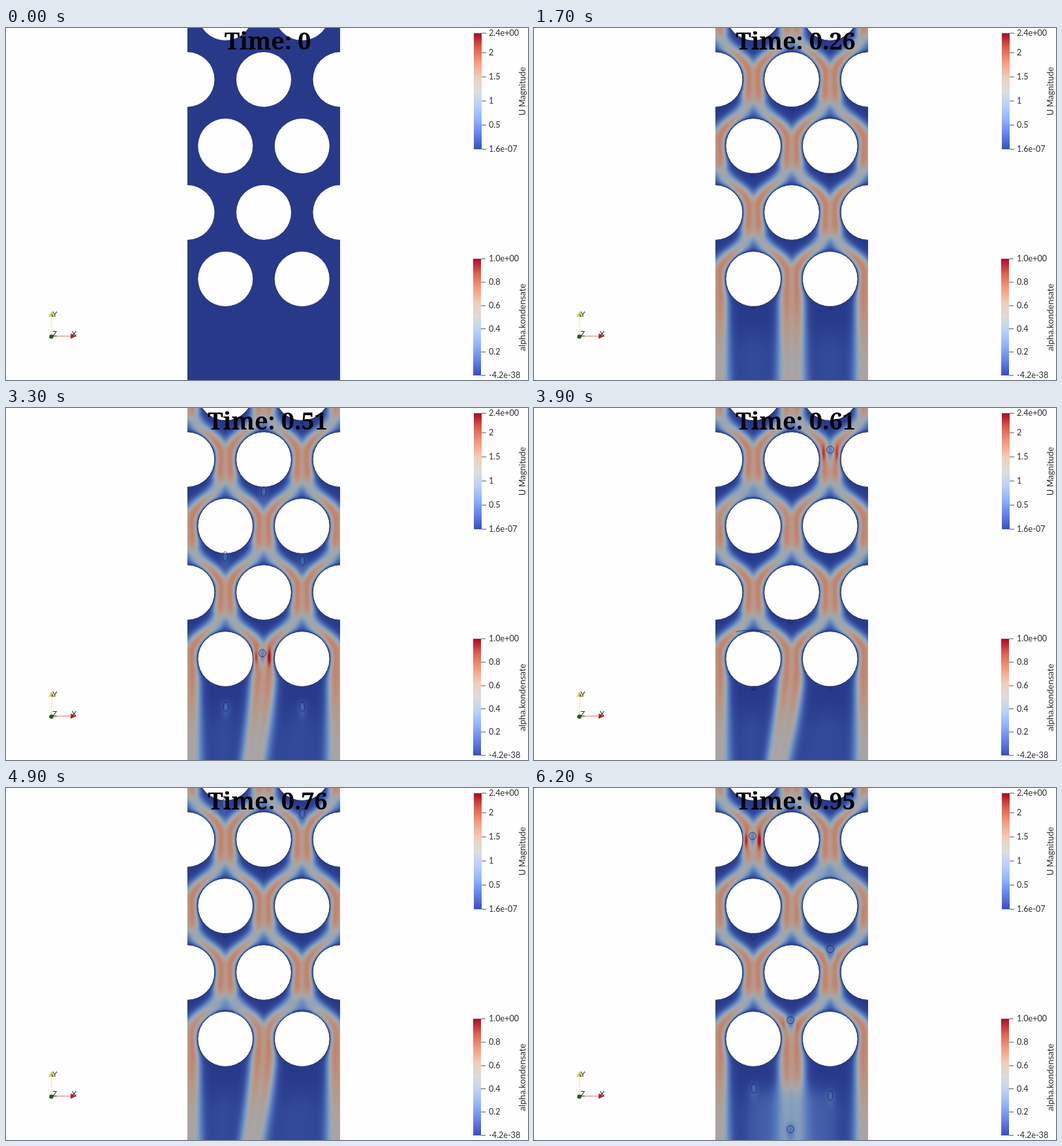
An HTML page with a canvas that plays this animation: 800 by 540 pixels, repeating every 6.3 s.

```html
<!DOCTYPE html>
<html lang="en">
<head>
<meta charset="utf-8">
<title>Tube bank flow</title>
<style>
  html, body { margin: 0; width: 100%; height: 100%; overflow: hidden; background: #fefefe; }
  canvas { display: block; }
</style>
</head>
<body>
<canvas id="stage" width="800" height="540"></canvas>
<script>
const ctx = document.getElementById('stage').getContext('2d');
const STEP = 100, STEPS = 63;
const LEFT = 278, W = 234, H = 540;
const WALL = 277.5, PITCH = 117.5, HALF = PITCH / 2, ROW = 102, TOP = -23, R = 42;
const VMAX = 2.405;

const clamp = (v, a = 0, b = 1) => Math.max(a, Math.min(b, v));
const gauss = d => Math.exp(-d * d);
const smooth = t => { t = clamp(t); return t * t * (3 - 2 * t); };

// Linear interpolation through [time, value] points.
function track(points, t) {
  for (let i = 1; i < points.length; i++) {
    const [a, va] = points[i - 1], [b, vb] = points[i];
    if (t <= b) return va + (vb - va) * clamp((t - a) / (b - a));
  }
  return points[points.length - 1][1];
}

const CLOCK = [[0, 0], [9, 14], [24, 37], [33, 51], [45, 70], [54, 83], [62, 95]];
const SWAY = [[18, 0], [24, -9], [33, -17], [45, -30], [54, -6], [62, 0]];
const FADE = [[55, 0], [62, 0.6]];

// Lit colours of the speed map.
const SHADES = [[0, 40, 57, 138], [0.1, 52, 76, 156], [0.25, 86, 121, 188], [0.4, 135, 160, 190],
  [0.5, 165, 167, 170], [0.62, 186, 150, 132], [0.75, 198, 122, 97], [0.88, 186, 68, 58], [1, 178, 14, 36]];
const lut = Array.from({ length: 256 }, (_, i) =>
  [1, 2, 3].map(c => track(SHADES.map(s => [s[0], s[c]]), i / 255)));

// Speed of the settled flow: streams that weave between the tubes, mirrored about every column.
function speed(x, y, wide) {
  const k = Math.min(4, Math.floor((y - TOP) / ROW));
  const s = y - TOP - ROW * k;
  let p = Math.abs(x - WALL) % PITCH;
  p = Math.min(p, PITCH - p);
  if (k % 2) p = HALF - p;
  const layer = d => 1 - Math.exp(-Math.max(0, d) / 2.6);
  let wall = layer(Math.hypot(p - HALF, s) - R);
  let path = 8, lean = 1, sigma, peak;
  if (k === 4) {
    sigma = 8.5 + s * 0.02;
    peak = 1.75 - 0.5 * smooth(s / 140);
  } else {
    wall *= layer(Math.hypot(p, s - ROW) - R);
    const t = clamp((s - 31) / 61);
    path += 43 * smooth(t);
    lean = 1 / Math.hypot(1, 43 * 6 * t * (1 - t) / 61);
    sigma = 8.5 + Math.sin(Math.PI * s / ROW) ** 2;
    peak = 1.75 - 0.58 * gauss((s - 46) / 17);
  }
  const stream = q => gauss((q - path) * lean / (sigma * 1.414 * wide)) ** 3;
  const sum = stream(p) + stream(-p) + stream(PITCH - p);
  let v = peak * Math.cbrt(sum) * wall;
  if (k === 4) v += 0.22 * gauss((p - HALF) / 30) * smooth((s - 50) / 70);
  return v;
}

function makeField(wide, scale) {
  const out = new Float32Array(W * H);
  for (let y = 0; y < H; y++)
    for (let x = 0; x < W; x++) out[y * W + x] = scale * speed(x + LEFT + 0.5, y + 0.5, wide);
  return out;
}
const early = makeField(2, 0.75), settled = makeField(1, 1);
const field = new Float32Array(W * H);
const image = ctx.createImageData(W, H);

// Drip points under the tubes: x, y, then the steps at which a drop lets go.
const DRIPS = [
  [335, 19, 22.15, 33.8, 40.3, 48, 58.7], [454, 19, 22, 36, 47, 57],
  [395, 121, 20, 31.8, 49.1, 62], [336, 223, 20.8, 32, 43.6, 50.7, 61.5],
  [454, 223, 21, 31.5, 43.5, 59.8], [393, 325, 21.1, 29.8, 41.75, 55.7, 59.5],
  [337, 427, 20.9, 30.5, 40.4, 42.5, 59.4], [454, 427, 20.8, 30.5, 41.8, 53.2, 59]];

function activeDrops(step) {
  const drops = [];
  for (const [x, y0, ...starts] of DRIPS) {
    for (const start of starts) {
      const n = step - start, lands = y0 < 300;
      if (n < -4 || n > 7) continue;
      if (n < 0.6) {
        const ry = 2 + 0.4 * (n + 4) + Math.max(0, n) * 2;
        drops.push({ kind: 'hang', x, y: y0 + ry, rx: 3.6, ry });
      } else if (lands && n > 4.6) {
        drops.push({ kind: 'film', x, y: y0 + 120, age: (n - 4.6) / 2.4 });
      } else {
        const y = y0 + 5 * n * n, free = y0 > 400;
        const long = free || n < 2.2;
        drops.push({ kind: 'fall', x, y, rx: long ? 4 : 5.5, ry: long ? 7.5 : 5.5,
          squeeze: free ? 0 : gauss((y - y0 - 60) / 24) });
      }
    }
  }
  return drops;
}

function around(cx, cy, rx, ry, change) {
  const x0 = Math.max(0, Math.floor(cx - rx - LEFT)), x1 = Math.min(W, Math.ceil(cx + rx - LEFT));
  const y0 = Math.max(0, Math.floor(cy - ry)), y1 = Math.min(H, Math.ceil(cy + ry));
  for (let y = y0; y < y1; y++)
    for (let x = x0; x < x1; x++) {
      const i = y * W + x;
      field[i] = change(field[i], x + LEFT + 0.5 - cx, y + 0.5 - cy);
    }
}

function disturb(drop) {
  if (drop.kind === 'fall') {
    around(drop.x, drop.y, 26, 45, (v, dx, dy) => {
      const w = Math.exp(-dx * dx / 46 - dy * dy / (dy > 0 ? 340 : 70));
      const rush = drop.squeeze * gauss((Math.abs(dx) - 10.5) / 3.8) * gauss((dy - 6) / 13);
      return v + (0.5 - v) * w * 0.85 + 1.05 * rush;
    });
  } else if (drop.kind === 'film') {
    const fade = 0.75 * (1 - drop.age);
    around(drop.x, drop.y, 58, 45, (v, dx, dy) => {
      const gap = Math.hypot(dx, dy - R) - R;
      return v + (0.95 - v) * fade * gauss((gap - 8) / 13) * gauss(dx / 42) * (dy < R ? 1 : 0);
    });
  }
}

function buildField(step, drops) {
  if (!step) { field.fill(0); return; }
  const grown = smooth(step / 7), ramp = smooth((step + 1) / 3);
  const sway = track(SWAY, step), fade = track(FADE, step);
  const base = i => early[i] + (settled[i] - early[i]) * grown;
  for (let y = 0; y < H; y++) {
    const down = clamp((y - 395) / 145) ** 1.5;
    for (let x = 0; x < W; x++) {
      const off = (x + LEFT - 395) / 75;
      const bump = Math.max(0, 1 - off * off);
      const sx = clamp(x - sway * down * bump, 0, W - 1), x0 = Math.floor(sx);
      const a = base(y * W + x0), b = base(y * W + Math.min(x0 + 1, W - 1));
      let v = ramp * (a + (b - a) * (sx - x0));
      if (fade) v += (0.72 - v) * fade * bump * smooth((y - 435) / 50);
      field[y * W + x] = v;
    }
  }
  drops.forEach(disturb);
}

function paintField() {
  for (let i = 0; i < W * H; i++) {
    const c = lut[Math.round(clamp(field[i] / VMAX) * 255)];
    image.data.set(c, i * 4);
    image.data[i * 4 + 3] = 255;
  }
  ctx.putImageData(image, LEFT, 0);
}

function paintTubes(outlined) {
  ctx.save();
  ctx.beginPath();
  ctx.rect(LEFT, 0, W, H);
  ctx.clip();
  ctx.strokeStyle = '#1c2858';
  ctx.lineWidth = 1;
  for (let row = 0; row < 5; row++)
    for (let x = WALL + (row % 2 ? 0 : HALF); x <= WALL + 2 * PITCH; x += PITCH) {
      ctx.beginPath();
      ctx.arc(x, TOP + row * ROW, outlined ? R + 0.4 : R, 0, 7);
      ctx.fillStyle = '#fefefe';
      ctx.fill();
      if (outlined) ctx.stroke();
    }
  ctx.restore();
}

function paintDrop(drop) {
  ctx.strokeStyle = 'rgba(22,32,78,.85)';
  ctx.lineWidth = 0.9;
  ctx.beginPath();
  if (drop.kind === 'film') ctx.ellipse(drop.x, drop.y + 1, 8 + 18 * drop.age, 3, 0, Math.PI, 0);
  else ctx.ellipse(drop.x, drop.y, drop.rx, drop.ry, 0, 0, 7);
  ctx.stroke();
}

function label(text, x, y, size) {
  ctx.font = `${size}px Lato, sans-serif`;
  ctx.fillStyle = '#2a2a2a';
  ctx.fillText(text, x, y);
}

function legend(x, y0, y1, title, titleY, titleSize, ticks) {
  const bar = ctx.createLinearGradient(0, y0, 0, y1);
  ['#b40426', '#dd5f4b', '#f49a7b', '#f2cbb7', '#dddddd', '#b9d0f9', '#8db0fe', '#6282ea', '#3b4cc0']
    .forEach((c, i) => bar.addColorStop(i / 8, c));
  ctx.fillStyle = bar;
  ctx.fillRect(x, y0, 12, y1 - y0);
  ctx.textAlign = 'left';
  for (const [text, y] of ticks) {
    ctx.fillStyle = '#555';
    ctx.fillRect(x + 12, y - 0.5, 7, 1);
    label(text, 740, y + 4, 12.6);
  }
  ctx.save();
  ctx.translate(795.5, titleY);
  ctx.rotate(-Math.PI / 2);
  ctx.textAlign = 'center';
  label(title, 0, 0, titleSize);
  ctx.restore();
}

function shape(color, ...points) {
  ctx.fillStyle = color;
  ctx.beginPath();
  points.forEach(([x, y]) => ctx.lineTo(x, y));
  ctx.fill();
}

function paintAxes() {
  ctx.fillStyle = '#efeeb0';
  ctx.fillRect(69, 442, 1.3, 29);
  ctx.fillStyle = '#ee8f7c';
  ctx.fillRect(72, 472, 28, 1.3);
  shape('#d3d23c', [69.5, 434.5], [73.5, 443], [65.5, 443]);
  shape('#77772c', [70.5, 437], [73.5, 443], [70, 443]);
  shape('#d63a30', [108, 472.5], [99, 468.5], [99, 476.5]);
  shape('#8c2a24', [108, 472.5], [99, 473], [99, 476.5]);
  ctx.fillStyle = '#17601b';
  ctx.beginPath();
  ctx.arc(69.5, 473.5, 3.2, 0, 7);
  ctx.fill();
  ctx.textAlign = 'left';
  label('Y', 71, 443, 12);
  label('X', 100.5, 473, 12);
  label('Z', 71, 473, 12);
}

function paint(step) {
  const drops = activeDrops(step);
  ctx.fillStyle = '#fefefe';
  ctx.fillRect(0, 0, 800, 540);
  buildField(step, drops);
  paintField();
  paintTubes(step > 0);
  drops.forEach(paintDrop);
  legend(717, 8, 186, 'U Magnitude', 97, 13,
    [['2.4e+00', 8], ['2', 38], ['1.5', 75], ['1', 112], ['0.5', 149], ['1.6e-07', 186]]);
  legend(716, 354, 533, 'alpha.kondensate', 444, 13.5,
    [['1.0e+00', 354], ['0.8', 390], ['0.6', 426], ['0.4', 461.5], ['0.2', 497], ['-4.2e-38', 533]]);
  paintAxes();
  ctx.font = 'bold 36px "Noto Serif", serif';
  ctx.textAlign = 'center';
  ctx.fillStyle = '#000';
  ctx.fillText('Time: ' + Math.round(track(CLOCK, step)) / 100, 401, 33);
}

let start, shown = -1;
function tick(now) {
  start ??= now;
  const step = Math.floor((now - start) / STEP) % STEPS;
  if (step !== shown) paint(shown = step);
  requestAnimationFrame(tick);
}
requestAnimationFrame(tick);
</script>
</body>
</html>
```
